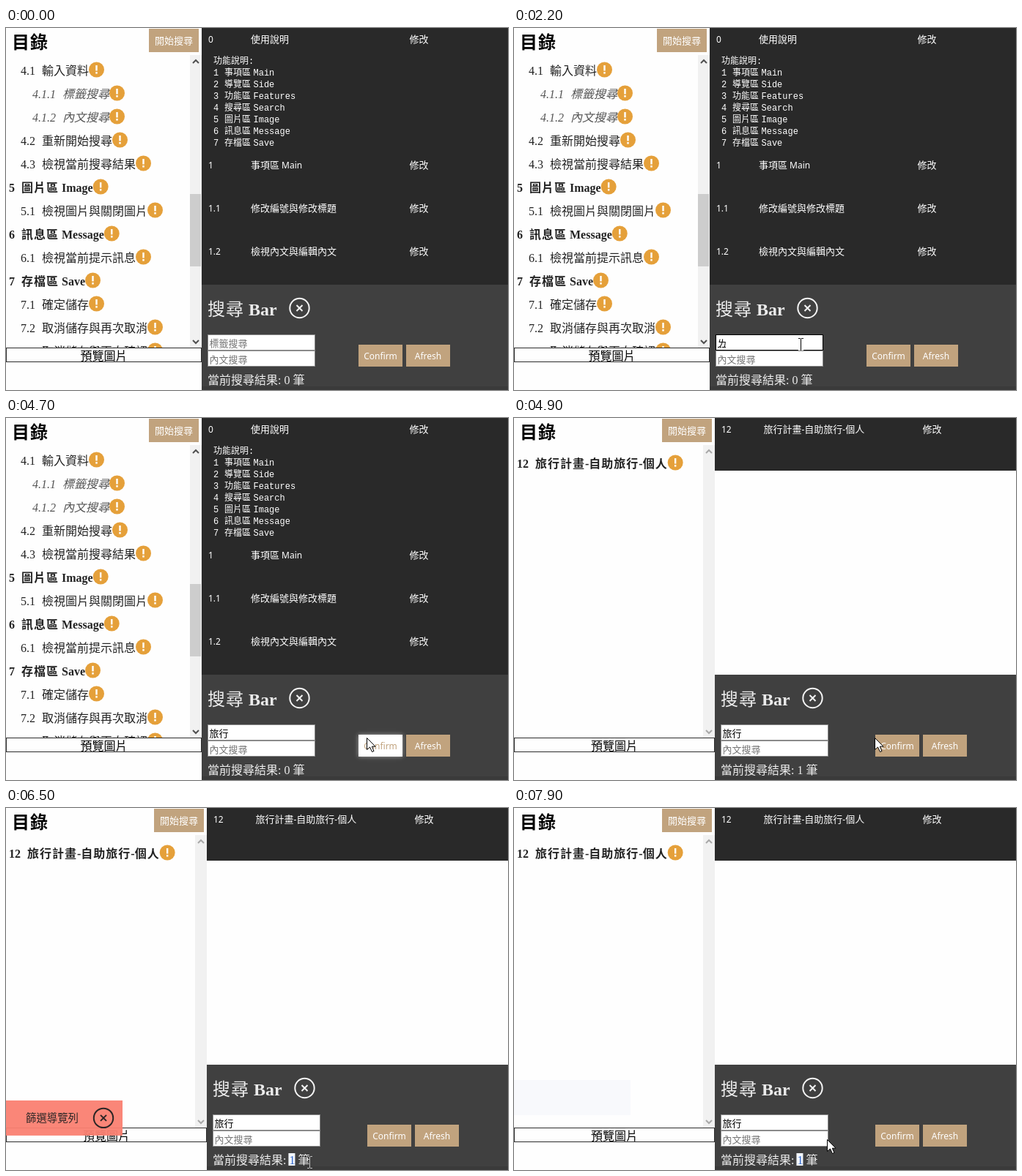
An HTML page with a canvas that plays this animation: 685x495 px, repeating every 8000 ms.

```html
<!DOCTYPE html>
<html lang="zh-Hant">
<head>
<meta charset="utf-8">
<style>
  html, body { margin: 0; width: 100%; height: 100%; overflow: hidden; background: #fff; }
  canvas { display: block; }
</style>
</head>
<body>
<canvas id="stage" width="685" height="495"></canvas>
<script>
const c = document.getElementById('stage').getContext('2d');
const CJK = '"Noto Sans CJK TC", "Noto Sans CJK", sans-serif';
const SERIF = '"Liberation Serif", serif';
const SANS = '"Noto Sans", sans-serif';
const MONO = '"Liberation Mono", monospace';
const TAN = [193, 163, 126], WHITE = [255, 255, 255];
const LOOP = 8000, STEP = 100, SWITCH = 4900;

const OUTLINE = [
  ['4.1', '輸入資料'], ['4.1.1', '標籤搜尋'], ['4.1.2', '內文搜尋'],
  ['4.2', '重新開始搜尋'], ['4.3', '檢視當前搜尋結果'],
  ['5', '圖片區 Image'], ['5.1', '檢視圖片與關閉圖片'],
  ['6', '訊息區 Message'], ['6.1', '檢視當前提示訊息'],
  ['7', '存檔區 Save'], ['7.1', '確定儲存'],
  ['7.2', '取消儲存與再次取消'], ['7.3', '取消儲存與再次確認']
];
const FEATURES = [
  ['事項區', 'Main'], ['導覽區', 'Side'], ['功能區', 'Features'], ['搜尋區', 'Search'],
  ['圖片區', 'Image'], ['訊息區', 'Message'], ['存檔區', 'Save']
];
const ROWS = [
  ['0', '使用說明', 15], ['1', '事項區 Main', 187],
  ['1.1', '修改編號與修改標題', 246], ['1.2', '檢視內文與編輯內文', 305]
];
const TYPED = [
  [0, ''], [2200, 'ㄌ'], [2300, 'ㄌㄩ'], [2400, '呂'], [2700, '呂ㄒ'],
  [2800, '呂ㄒ一'], [2900, '呂ㄒ一ㄥ'], [3300, '旅行']
];
// Pointer path: time, x, y
const PATH = [
  [100, 587, 204], [300, 545, 262], [600, 420, 405], [800, 391, 432],
  [4000, 391, 432], [4500, 492, 437], [4900, 492, 437], [5400, 490, 455],
  [5700, 393, 485], [5800, 393, 485], [6200, 396, 486], [6300, 396, 486],
  [7000, 458, 478], [7200, 458, 478], [7900, 427, 453]
];

const clamp = v => Math.max(0, Math.min(1, v));
const mix = (a, b, p) => `rgb(${a.map((v, i) => v + (b[i] - v) * p)})`;

function box(x, y, w, h, color) {
  c.fillStyle = color;
  c.fillRect(x, y, w, h);
}

// Draws mixed Chinese and Latin text around the middle line y; returns its right end.
function say(str, x, y, { size = 16, latin = size, face = SERIF, style = '', color = '#000', extra = 0 } = {}) {
  c.fillStyle = color;
  const base = Math.round(y + size * 0.35);
  for (const run of str.match(/[\u2e80-\uffff]+|[^\u2e80-\uffff]+/g) || []) {
    const han = run.charCodeAt(0) >= 0x2e80;
    c.font = `${style} ${han ? size : latin}px ${han ? CJK : face}`;
    if (han) {
      for (const ch of run) {
        c.fillText(ch, x, base);
        x += size + extra;
      }
    } else {
      c.fillText(run, x, base);
      x += c.measureText(run).width;
    }
  }
  return x;
}
const ui = (str, x, y, color = '#fff') => say(str, x, y, { size: 13, latin: 12, face: SANS, color });

function disc(x, y, r) {
  c.beginPath();
  c.arc(x, y, r, 0, 7);
}

function badge(x, y) {
  c.fillStyle = '#e5a03a';
  disc(x, y, 10.5);
  c.fill();
  box(x - 1.2, y - 6, 2.4, 7.5, '#fff');
  box(x - 1.2, y + 3, 2.4, 2.6, '#fff');
}

function closeIcon(x, y, color) {
  c.strokeStyle = color;
  c.lineWidth = 2;
  disc(x, y, 13.2);
  c.moveTo(x - 4, y - 4); c.lineTo(x + 4, y + 4);
  c.moveTo(x + 4, y - 4); c.lineTo(x - 4, y + 4);
  c.stroke();
}

function frame(x, y, w, h, color) {
  c.strokeStyle = color;
  c.lineWidth = 1;
  c.strokeRect(x + 0.5, y + 0.5, w - 1, h - 1);
}

function chevron(x, y, dir, color) {
  c.strokeStyle = color;
  c.lineWidth = 2;
  c.beginPath();
  c.moveTo(x - 4, y + 2 * dir);
  c.lineTo(x, y - 2 * dir);
  c.lineTo(x + 4, y + 2 * dir);
  c.stroke();
}

function entry([num, label], y) {
  const depth = num.split('.').length - 1;
  const opt = [
    { style: 'bold', extra: 1, color: '#222' },
    { color: '#222' },
    { style: 'italic', color: '#555' }
  ][depth];
  const x = say(num, 4 + depth * 16, y, opt);
  badge(say(label, x + 9, y, opt) + 10.5, y - 1);
}

function sidebar(found, w) {
  box(0, 0, w, 495, '#fefefe');
  say('目錄', 8, 20, { size: 24, extra: 1, style: 'bold' });
  box(w - 72, 1, 68, 32, mix(TAN, WHITE, 0));
  ui('開始搜尋', w - 64, 17);
  if (found) entry(['12', '旅行計畫-自助旅行-個人'], 62);
  else OUTLINE.forEach((row, i) => entry(row, 58 + 32 * i));

  box(w - 16, 37, 16, 400, '#f1f1f1');
  if (!found) box(w - 16, 227, 15, 99, '#cdcdcd');
  const arrow = found ? '#a8a8a8' : '#505050';
  chevron(w - 8, 46, 1, arrow);
  chevron(w - 8, 429, -1, arrow);

  box(0, 437, w, 58, '#fefefe');
  frame(0, 437, w, 20, '#2c2c2c');
  say('預覽圖片', w / 2 - 32, 448);
}

function records(found, w) {
  box(w, 0, 685 - w, 351, found ? '#fefefe' : '#292929');
  if (found) {
    box(w, 0, 685 - w, 72, '#292929');
    ui('12', 283, 15);
    ui('旅行計畫-自助旅行-個人', 340.5, 15);
    ui('修改', 557.5, 15);
    return;
  }
  for (const [num, label, y] of ROWS) {
    ui(num, 276, y);
    ui(label, 334, y);
    ui('修改', 550.5, y);
  }
  const mono = { size: 12, face: MONO, color: '#fff' };
  say('功能說明:', 283, 45, mono);
  FEATURES.forEach(([han, name], i) => {
    const y = 61 + 16 * i;
    say(String(i + 1), 283, y, mono);
    say(han, 298, y, mono);
    say(name, 337.5, y, mono);
  });
}

function button(label, x, hover) {
  c.save();
  if (hover) {
    c.shadowColor = `rgba(255,255,255,${hover * 0.5})`;
    c.shadowBlur = 6;
  }
  box(x, 433, 60, 30, mix(TAN, WHITE, hover));
  c.restore();
  c.font = `12px ${SANS}`;
  ui(label, x + 30 - c.measureText(label).width / 2, 448, mix(WHITE, TAN, hover));
}

function field(x, y, text, hint, focused) {
  box(x, y, 147, 22, '#fff');
  frame(x, y, 147, 22, focused ? '#000' : '#8a8a8a');
  return ui(text || hint, x + 2.5, y + 12, text ? '#000' : '#757575');
}

function search(t, found, w) {
  const x = w + 8, light = '#ebebeb';
  box(w, 351, 685 - w, 144, '#404040');
  box(w, 490, 685 - w, 5, '#3a3a3a');
  const end = say('搜尋', x, 385, { size: 24, extra: 1, style: '500', color: light });
  say('Bar', end + 6, 385, { size: 24, style: 'bold', color: light });
  closeIcon(x + 125.5, 383, '#f4f4f4');

  const text = TYPED.filter(k => k[0] <= t).pop()[1];
  const focused = t >= 800 && t < 4600;
  const right = field(x, 419, text, '標籤搜尋', focused);
  field(x, 441, '', '內文搜尋', false);
  if (t >= 2200 && t < 3500) {
    for (let u = x + 3; u < right - 1; u += 3) box(u, 436, 2, 1, '#000');
  }
  const caretOn = t >= 800 && t < 1300 || t >= 1800 && t < 2200 ||
    t >= 3300 && t < 3700 || t >= 4200 && t < 4600;
  if (caretOn) box(text ? 304 : 278, 422, 1, 16, '#000');

  button('Confirm', found ? 493 : 481, found ? 0 : clamp((t - 4300) / 400));
  button('Afresh', found ? 558 : 546, 0);

  const n = say('當前搜尋結果: ', x, 481, { color: light });
  const picked = t >= 6400;
  if (picked) box(n - 1, 472, 9, 17, '#f2f6fd');
  const after = say(found ? '1' : '0', n, 481, { color: picked ? '#2f66cc' : light });
  say(' 筆', after, 481, { color: light });
}

// Notice slides in from the left, then drifts up and fades.
function notice(t) {
  if (t < SWITCH) return;
  const enter = 1 - (1 - clamp((t - SWITCH) / 700)) ** 3;
  const leave = clamp((t - 6350) / 1550);
  const x = -159 * (1 - enter), y = 401 - 29 * leave ** 1.4;
  if (leave === 1) return box(0, y, 159, 48, '#f8f9fc');
  c.save();
  c.globalAlpha = 0.96 * enter * (1 - leave ** 2.1);
  box(x, y, 159, 48, 'rgb(250,128,114)');
  say('篩選導覽列', x + 27, y + 24, { size: 14.4, color: '#222' });
  closeIcon(x + 133, y + 24, '#222');
  c.restore();
}

function pointer(t) {
  if (t < PATH[0][0]) return;
  const i = Math.max(1, PATH.findIndex(k => k[0] >= t));
  const [t0, x0, y0] = PATH[i - 1], [t1, x1, y1] = PATH[i];
  const p = clamp((t - t0) / (t1 - t0));
  const x = Math.round(x0 + (x1 - x0) * p), y = Math.round(y0 + (y1 - y0) * p);
  c.save();
  c.translate(x, y);
  if (t >= 700 && t <= 4100 || t >= 5700 && t <= 6500) {
    c.globalCompositeOperation = 'difference';
    box(0, -7, 1, 15, '#fff');
    for (const v of [-8, 8]) {
      box(-3, v, 3, 1, '#fff');
      box(1, v, 3, 1, '#fff');
    }
  } else {
    c.beginPath();
    [[0, 0], [0, 16], [4, 12.5], [7, 19], [9.5, 18], [6.8, 11.7], [11.5, 11.7]]
      .forEach(([u, v]) => c.lineTo(u + 0.5, v + 0.5));
    c.closePath();
    c.fillStyle = '#fff';
    c.fill();
    c.strokeStyle = '#000';
    c.lineWidth = 1;
    c.stroke();
  }
  c.restore();
}

function draw(now) {
  const t = Math.floor(now % LOOP / STEP) * STEP;
  const found = t >= SWITCH, w = found ? 274 : 267;
  sidebar(found, w);
  records(found, w);
  search(t, found, w);
  notice(t);
  pointer(t);
}

const start = performance.now();
function tick() {
  draw(performance.now() - start);
  requestAnimationFrame(tick);
}
tick();
</script>
</body>
</html>
```
